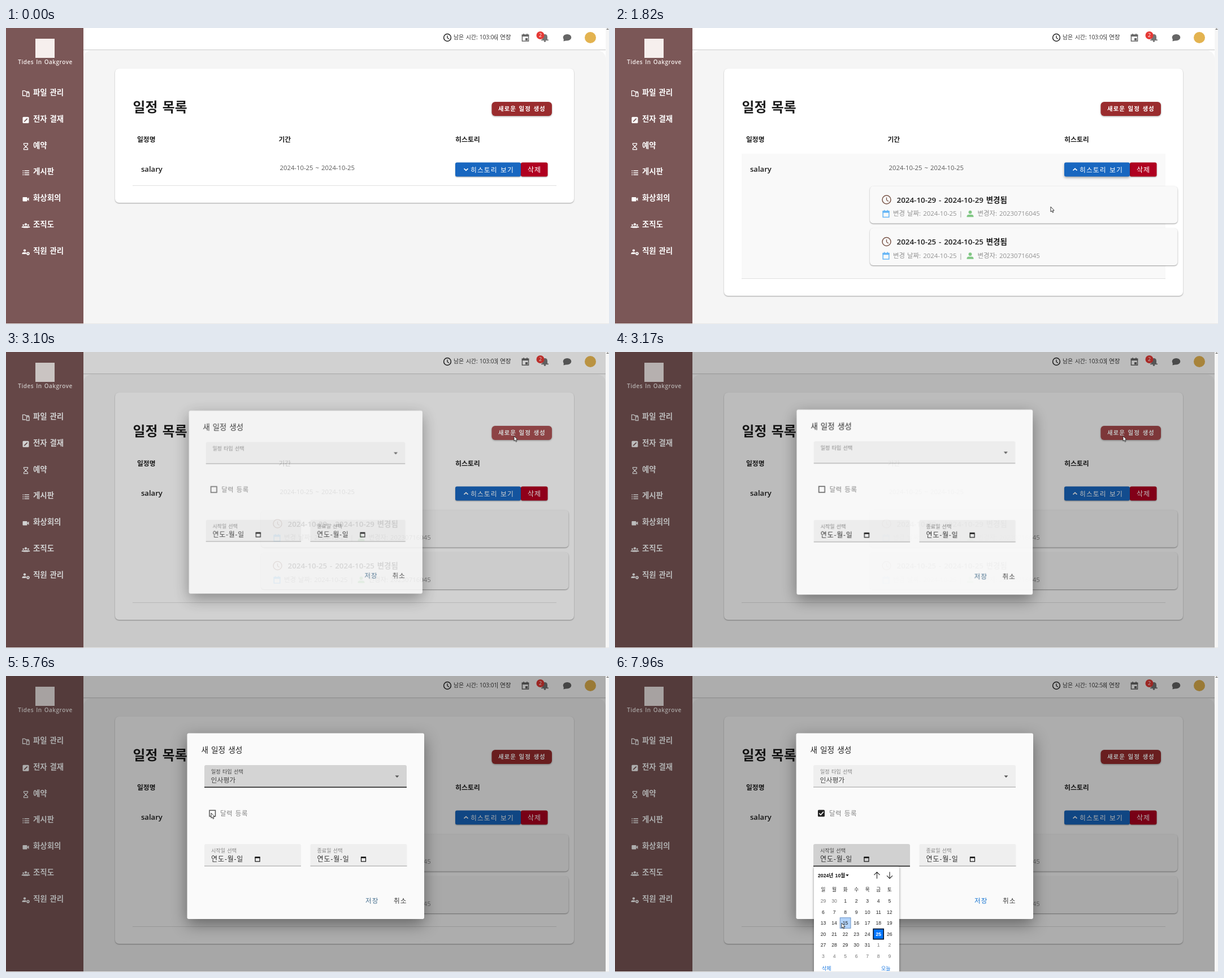
An HTML page with a canvas for the animation above (8 s loop, 1067 by 525 pixels).

```html
<!DOCTYPE html>
<html lang="ko">
<head>
<meta charset="utf-8">
<title>일정 목록</title>
<style>
  html, body { margin: 0; width: 100%; height: 100%; overflow: hidden; background: #f5f5f5; }
  canvas { display: block; }
</style>
</head>
<body>
<canvas id="stage" width="1067" height="525"></canvas>
<script>
const W = 1067, H = 525, LOOP = 8000;
const SANS = '"Open Sans", "Noto Sans CJK KR", "Noto Sans CJK", sans-serif';
const ARIAL = '"Liberation Sans", "Noto Sans CJK KR", "Noto Sans CJK", sans-serif';
const screen = document.getElementById('stage').getContext('2d');
const layerCanvas = Object.assign(document.createElement('canvas'), { width: W, height: H });
const layer = layerCanvas.getContext('2d');
let g = screen;

// ---- timing ----
const clamp = v => Math.max(0, Math.min(1, v));
const ramp = (t, a, b) => clamp((t - a) / (b - a));
const during = (t, a, b) => t >= a && t < b;
const gray = v => `rgb(${v},${v},${v})`;

function bezier(p, x1, y1, x2, y2) {
  const at = (u, a, b) => 3 * u * (1 - u) * (1 - u) * a + 3 * u * u * (1 - u) * b + u * u * u;
  let lo = 0, hi = 1;
  for (let i = 0; i < 24; i++) {
    const mid = (lo + hi) / 2;
    if (at(mid, x1, x2) < p) lo = mid; else hi = mid;
  }
  return at(lo, y1, y2);
}

const TICKS = [950, 1950, 2950, 3950, 4950, 5950, 7020, 7930];
function clockText(t) {
  const left = 103 * 60 + 6 - TICKS.filter(k => t >= k).length;
  return `${Math.floor(left / 60)}:${String(left % 60).padStart(2, '0')}`;
}

// time, x, y of the pointer tip
const PATH = [
  [400, 1056, 520], [1000, 872, 262], [1150, 858, 250], [1380, 858, 250],
  [1820, 771, 317], [2010, 745, 392], [2080, 745, 392], [2560, 899, 149],
  [3250, 899, 149], [3520, 640, 190], [3580, 640, 190], [3980, 408, 180],
  [4400, 400, 178], [4590, 428, 248], [5060, 428, 248], [5620, 363, 243],
  [5900, 363, 243], [6550, 440, 322], [7020, 440, 322], [7480, 428, 455],
  [7820, 424, 442], [7880, 424, 442], [7960, 401, 438]
];
function pointer(t) {
  if (t < PATH[0][0]) return null;
  const i = PATH.findIndex(p => p[0] > t);
  if (i < 0) return { x: 401, y: 438 };
  const [a, x0, y0] = PATH[i - 1], [b, x1, y1] = PATH[i];
  const k = ramp(t, a, b), e = k * k * (3 - 2 * k);
  return { x: x0 + (x1 - x0) * e, y: y0 + (y1 - y0) * e };
}
const inside = (p, x, y, w, h) => p && p.x >= x && p.x < x + w && p.y >= y && p.y < y + h;

// ---- drawing helpers ----
function text(s, x, y, size, color = '#222', weight = 400, ls = 0, align = 'left', family = SANS) {
  g.font = `${weight} ${size}px ${family}`;
  g.letterSpacing = ls + 'px';
  g.wordSpacing = size * 0.1 + 'px';
  g.textAlign = align;
  g.fillStyle = color;
  g.fillText(s, x, y + size * 0.36);
}
function rect(x, y, w, h, color) {
  g.fillStyle = color;
  g.fillRect(x, y, w, h);
}
function box(x, y, w, h, r, color, blur = 0, dy = 0, shade = 0.3) {
  g.save();
  if (blur) {
    g.shadowColor = `rgba(0,0,0,${shade})`;
    g.shadowBlur = blur;
    g.shadowOffsetY = dy;
  }
  g.fillStyle = color;
  g.beginPath();
  g.roundRect(x, y, w, h, r);
  g.fill();
  g.restore();
}
function dot(x, y, r, color) {
  g.fillStyle = color;
  g.beginPath();
  g.arc(x, y, r, 0, 7);
  g.fill();
}
function line(color, width, ...pts) {
  g.strokeStyle = color;
  g.lineWidth = width;
  g.beginPath();
  for (let i = 0; i < pts.length; i += 2) g.lineTo(pts[i], pts[i + 1]);
  g.stroke();
}
function poly(color, ...pts) {
  g.fillStyle = color;
  g.beginPath();
  for (let i = 0; i < pts.length; i += 2) g.lineTo(pts[i], pts[i + 1]);
  g.closePath();
  g.fill();
}
function frame(x, y, w, h, color, width = 1.3) {
  g.strokeStyle = color;
  g.lineWidth = width;
  g.strokeRect(x, y, w, h);
}
function clockIcon(x, y, r, color) {
  g.strokeStyle = color;
  g.lineWidth = 1.5;
  g.beginPath();
  g.arc(x, y, r, 0, 7);
  g.stroke();
  line(color, 1.3, x, y - r * 0.55, x, y + 0.5, x + r * 0.45, y + r * 0.4);
}
function calendarIcon(x, y, s, color) {
  frame(x - s / 2 + 0.7, y - s / 2 + 1.5, s - 1.4, s - 1.5, color, 1.5);
  rect(x - s / 2, y - s / 2 + 1, s, s * 0.27, color);
  rect(x - s * 0.3, y - s / 2 - 0.7, 1.6, 2.5, color);
  rect(x + s * 0.3 - 1.6, y - s / 2 - 0.7, 1.6, 2.5, color);
}
function person(x, y, s, color) {
  dot(x, y - s * 0.28, s * 0.24, color);
  box(x - s / 2, y + s * 0.08, s, s * 0.36, [s * 0.3, s * 0.3, 0, 0], color);
}

// ---- sidebar ----
const C = '#fff';
const MENU = [
  ['파일 관리', (x, y) => {
    line(C, 1.3, x + 5, y - 1, x + 5, y - 3, x, y - 3, x - 1.5, y - 4.6, x - 5.5, y - 4.6, x - 5.5, y + 4, x, y + 4);
    frame(x + 1.5, y - 1, 4.5, 6.5, C, 1.3);
  }],
  ['전자 결재', (x, y) => {
    box(x - 5.5, y - 5, 11, 11, 1.5, C);
    line('#7b5757', 1.7, x - 2.8, y + 3.3, x + 2.8, y - 2.3);
  }],
  ['예약', (x, y) => {
    line(C, 1.2, x - 3.5, y - 5, x + 3.5, y - 5, x + 3.5, y - 3, x, y + 0.5, x + 3.5, y + 4, x + 3.5, y + 6,
      x - 3.5, y + 6, x - 3.5, y + 4, x, y + 0.5, x - 3.5, y - 3, x - 3.5, y - 5.5);
  }],
  ['게시판', (x, y) => {
    for (const d of [-3.5, 0, 3.5]) {
      rect(x - 5.5, y + d - 0.5, 1.6, 1.6, C);
      rect(x - 2.5, y + d - 0.5, 8.5, 1.5, C);
    }
  }],
  ['화상회의', (x, y) => {
    box(x - 5.5, y - 3.5, 8, 7.5, 1, C);
    poly(C, x + 2, y, x + 5.5, y - 3, x + 5.5, y + 3.5);
  }],
  ['조직도', (x, y) => {
    person(x - 4.3, y + 1, 6, C);
    person(x + 4.3, y + 1, 6, C);
    person(x, y + 0.5, 8.5, C);
  }],
  ['직원 관리', (x, y) => {
    person(x - 2, y, 9, C);
    dot(x + 4, y + 3, 3.6, '#7b5757');
    dot(x + 4, y + 3, 2.8, C);
    dot(x + 4, y + 3, 1, '#7b5757');
  }]
];
function sidebar() {
  rect(0, 0, 137, H, '#7b5757');
  rect(52, 19, 34, 34, '#f6efed');
  text('Tides In Oakgrove', 69.5, 60, 10, '#f6efed', 600, 0.5, 'center');
  MENU.forEach(([name, icon], i) => {
    const y = 114 + i * 46.85;
    icon(35, y + 2);
    text(name, 48, y, 13.4, C, 700);
  });
}

// ---- page ----
function header(t) {
  rect(137, 0, 924, 38, '#fff');
  rect(137, 38, 924, 1, '#d4d4d4');
  rect(137, 39, 924, 1, '#ececec');
  clockIcon(781, 17, 6.4, '#222');
  text('남은 시간: ' + clockText(t), 792, 16.5, 9.9, '#333');
  rect(869, 11, 1, 11, '#555');
  text('연장', 874, 16.5, 10.7, '#333');
  calendarIcon(919, 17, 12.5, '#666');
  rect(919, 18, 4, 4, '#666');
  const c = '#757575';
  box(949, 11, 9, 11, [4.5, 4.5, 0, 0], c);
  rect(947, 20.5, 13, 1.7, c);
  dot(953.5, 23.2, 1.7, c);
  dot(945.5, 13, 7, '#e53935');
  text('2', 945.5, 13, 9, '#fff', 400, 0, 'center');
  g.fillStyle = '#666';
  g.beginPath();
  g.ellipse(993, 16.7, 7.3, 5.8, 0, 0, 7);
  g.fill();
  poly('#666', 987, 18, 986.5, 23.5, 993, 22);
  dot(1034, 17, 10, '#e3b350');
}

function historyCard(y, day) {
  box(451, y, 544.5, 66, 6, '#f9f9f9', 2, 1, 0.4);
  clockIcon(480.5, y + 24, 7.5, '#795548');
  text(`2024-10-${day} - 2024-10-${day} 변경됨`, 498.5, y + 24.5, 13.4, '#1c1c1c', 600);
  calendarIcon(479.5, y + 49, 12, '#64b5f6');
  text('변경 날짜: 2024-10-25 |', 492, y + 48.5, 11.4, '#929292');
  person(628.5, y + 49.5, 12, '#81c784');
  text('변경자: 20230716045', 641.5, y + 48.5, 11.4, '#929292');
}

function page(t, p) {
  rect(137, 0, 924, H, '#fff');
  box(137, 40, 924, 500, 14, '#f5f5f5');
  sidebar();
  header(t);

  const open = t >= 1330;
  const rowEnd = open ? 444 : 279;
  box(193, 72, 812, open ? 403 : 238, 7, '#fff', 2, 1, 0.35);
  text('일정 목록', 224.5, 140, 23.8, '#1c1c1c', 700);

  box(859.5, 131, 106.5, 25, 6, '#9a2c2e', 3, 1, 0.35);
  const glow = 0.06 * ramp(t, 2480, 2560) + 0.16 * ramp(t, 2760, 2900)
    - 0.07 * ramp(t, 3010, 3170) - 0.15 * ramp(t, 3250, 3500);
  if (glow > 0) box(859.5, 131, 106.5, 25, 6, `rgba(255,255,255,${glow})`);
  text('새로운 일정 생성', 871, 143.5, 10.5, '#fff', 700, 0.95);

  text('일정명', 232, 198, 11.8, '#1c1c1c', 600);
  text('기간', 482.5, 198, 11.8, '#1c1c1c', 600);
  text('히스토리', 795, 198, 11.9, '#1c1c1c', 600);

  if (t < 2750 && inside(p, 224, 223, 750, rowEnd - 223)) rect(224, 223, 750, rowEnd - 223, '#f9f9f9');
  rect(224, rowEnd, 750, 1, '#e0e0e0');
  text('salary', 239, 250, 13.1, '#1c1c1c', 600);
  text('2024-10-25 ~ 2024-10-25', 484.5, 247.5, 11.3, '#5a5a5a');

  const raised = during(t, 1100, 2400);
  box(911, 238.5, 47.5, 25, 3, '#b00020', 2, 1, 0.35);
  box(795, 238.5, 116, 25, 3, '#1867c0', raised ? 4 : 2, raised ? 2 : 1, 0.35);
  const d = open ? -1.6 : 1.6;
  line('#fff', 1.6, 810.5, 251 - d, 814, 251 + d, 817.5, 251 - d);
  text('히스토리 보기', 822, 251.3, 11.8, '#fff', 400, 1.07);
  text('삭제', 923, 251.3, 12, '#fff', 400, 1);

  if (open) {
    historyCard(280.5, 29);
    historyCard(355, 25);
  }
}

// ---- dialog ----
function field(x, y, w, label, shade, active) {
  box(x, y, w, 39.5, [3, 3, 0, 0], gray(shade));
  rect(x, y + 38.5, w, active ? 1.6 : 1, active ? '#222' : '#a0a0a0');
  text(label, x + 12, y + 11.3, 9.1, active ? '#444' : '#858585');
}
function dateField(x, label, shade, active) {
  field(x, 298, 171, label, shade, active);
  text('연도-월-일', x + 12, 324.5, 12, '#2c2c2c', 400, 0.9);
  frame(x + 90, 321.5, 8, 7.5, '#111', 1.2);
  rect(x + 89.5, 320.5, 9, 2.6, '#111');
}
function dialog(t, p) {
  box(320.5, 101.5, 419.5, 329.5, 3, '#fafafa', 28, 9, 0.42);
  text('새 일정 생성', 345.5, 131.5, 13.7, '#222', 500);

  const focus = during(t, 4050, 5790), menu = during(t, 4050, 4980);
  const over = t > 3500 && inside(p, 351, 158, 358, 39);
  field(351, 158, 358, '일정 타입 선택', focus ? 212 : over ? 228 : 239, focus);
  if (menu) poly('#222', 688.5, 180, 695.5, 180, 692, 176.3);
  else poly('#555', 688.5, 176.5, 695.5, 176.5, 692, 180.2);
  if (t >= 4980) text('인사평가', 362.5, 184.5, 11.9, '#444');

  if (t >= 5800) {
    box(359, 237.5, 12, 12, 1.5, '#222');
    line('#fff', 1.6, 361.3, 243.5, 364, 246.3, 369, 240.7);
  } else frame(360, 238.3, 10.5, 10.5, '#555', 1.5);
  text('달력 등록', 379, 243.5, 11.5, '#858585', 400, 0.5);

  const start = t >= 6680;
  const startOver = t > 6000 && inside(p, 351, 298, 171, 39);
  dateField(351, '시작일 선택', start ? (t < 7100 ? 217 : 209) : startOver ? 228 : 239, start);
  dateField(538.5, '종료일 선택', 239, false);
  text('저장', 636, 399, 11.7, t < 7100 ? '#47708f' : '#1976d2', 400, 1);
  text('취소', 686, 399, 11.7, '#3a3a3a', 400, 1);
}

function typeMenu(t) {
  const a = ramp(t, 4050, 4200) * (1 - ramp(t, 4980, 5100));
  if (!a) return;
  g.globalAlpha = a;
  box(351, 198, 358, 78, [0, 0, 3, 3], '#fff', 7, 3, 0.4);
  if (t > 4500) rect(351, 237, 358, 33.5, '#f5f5f5');
  text('급여', 362.5, 219.5, 11.9, '#444');
  text('인사평가', 362.5, 253.5, 11.9, '#444');
  g.globalAlpha = 1;
}

function datePicker(p) {
  const label = (s, x, y, size, color, weight = 400, align = 'center') =>
    text(s, x, y, size, color, weight, 0, align, ARIAL);
  box(352, 338, 151, 200, 2, '#fff', 4, 1, 0.45);
  label('2024년 10월', 359, 353.5, 8.7, '#111', 700, 'left');
  poly('#111', 408.3, 352, 413.7, 352, 411, 355.2);
  for (const [x, d] of [[463.5, 1], [486, -1]]) {
    line('#222', 1.1, x, 353.5 + 6 * d, x, 353.5 - 5.5 * d);
    line('#222', 1.1, x - 5, 353.5 - 0.7 * d, x, 353.5 - 5.7 * d, x + 5, 353.5 - 0.7 * d);
  }
  [...'일월화수목금토'].forEach((s, i) => label(s, 368.5 + i * 19.55, 378.5, 8.6, '#222'));
  for (let i = 0; i < 42; i++) {
    const x = 368.5 + (i % 7) * 19.55, y = 399 + Math.floor(i / 7) * 19.55;
    const n = i - 1, other = n < 1 || n > 31;
    const today = n === 25;
    if (today) {
      rect(x - 9.8, y - 9.8, 19.6, 19.6, '#0075ff');
      frame(x - 9, y - 9, 18, 18, '#10131a', 1.5);
    } else if (inside(p, x - 9.8, y - 9.8, 19.55, 19.55)) {
      rect(x - 9.8, y - 9.8, 19.6, 19.6, '#b3d4fb');
      frame(x - 9.3, y - 9.3, 18.6, 18.6, '#7398c8', 1);
    }
    const day = n < 1 ? n + 30 : n > 31 ? n - 31 : n;
    label(day, x, y, 8.7, today ? '#fff' : other ? '#777' : '#222', today ? 700 : 400);
  }
  label('삭제', 366, 519, 9, '#1a78e0', 400, 'left');
  label('오늘', 471, 519, 9, '#1a78e0', 400, 'left');
}

function cursor(p, hand) {
  g.save();
  g.translate(p.x, p.y);
  g.lineJoin = 'round';
  g.lineWidth = 0.9;
  g.strokeStyle = '#222';
  g.fillStyle = '#fff';
  g.beginPath();
  const pts = hand
    ? [0, 0, 1.7, 0.5, 1.9, 5, 6, 5.8, 7, 7, 6.4, 11, 5.6, 13.3, 0.2, 13.3, -3, 8.8, -2.7, 7.4, -0.6, 8.6, -0.6, 0.7]
    : [0, 0, 0, 9, 2, 7.3, 3.4, 10.4, 4.9, 9.7, 3.5, 6.8, 6.1, 6.6];
  for (let i = 0; i < pts.length; i += 2) g.lineTo(pts[i], pts[i + 1]);
  g.closePath();
  g.fill();
  g.stroke();
  g.restore();
}

function draw(t) {
  const p = pointer(t);
  g = screen;
  page(t, p);

  const scrim = 0.32 * bezier(ramp(t, 2940, 3370), 0.4, 0, 0.2, 1);
  rect(0, 0, 1061, H, `rgba(0,0,0,${scrim})`);

  const shown = bezier(ramp(t, 2942, 3252), 0, 0, 0.2, 1);
  if (t > 2942) {
    g = layer;
    g.clearRect(0, 0, W, H);
    dialog(t, p);
    g = screen;
    g.save();
    g.globalAlpha = shown;
    const s = 0.9 + 0.1 * shown;
    g.translate(530 * (1 - s), 266.5 * (1 - s));
    g.scale(s, s);
    g.drawImage(layerCanvas, 0, 0);
    g.restore();
    typeMenu(t);
    if (t >= 6740) datePicker(p);
  }
  if (p) cursor(p, during(t, 3800, 5100));

  // scrollbar and lower edge
  rect(1061, 0, 6, H, '#f6f6f6');
  poly('#777', 1062, 3, 1067, 3, 1064.5, 0.5);
  rect(0, 524, W, 1, '#e6e6e6');
}

function tick() {
  draw(performance.now() % LOOP);
  requestAnimationFrame(tick);
}
tick();
</script>
</body>
</html>
```
